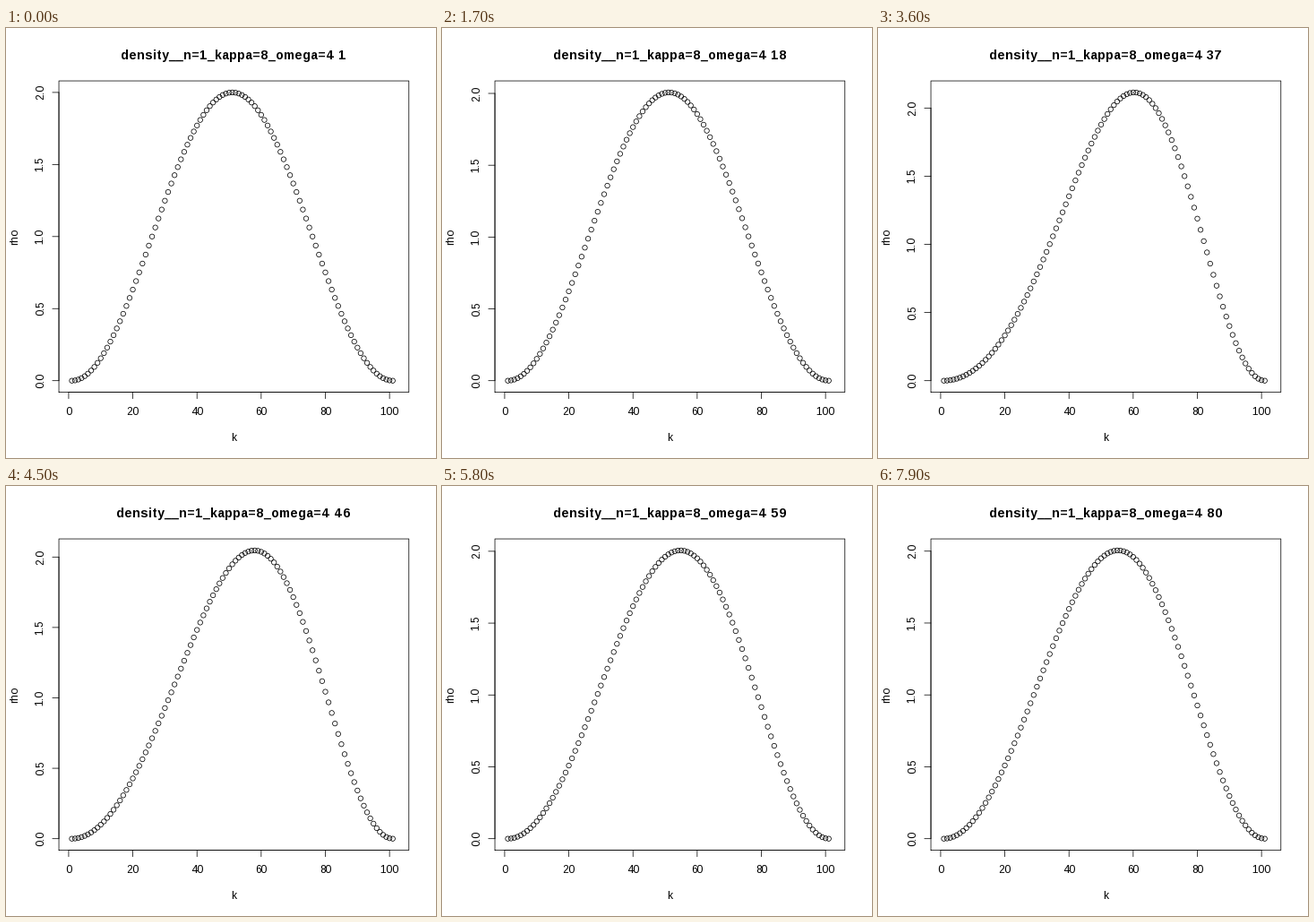
A matplotlib script for the animation above (8 s loop, 480 by 480 pixels).

```python
import numpy as np
import matplotlib.pyplot as plt
from matplotlib.animation import FuncAnimation
from matplotlib.collections import EllipseCollection

plt.rcParams.update({
    "font.family": "Liberation Sans",
    "font.size": 12,
    "text.hinting": "force_autohint",
    "text.hinting_factor": 1,
    "path.snap": False,
})

SIZE, DPI = 480, 72
FRAMES, INTERVAL = 80, 100
LEFT, RIGHT, TOP, BOTTOM = 59.04, 449.76, 59.04, 406.56
LINE = 14.4          # height of one margin line
TICK = 7.2
STROKE = 0.75

# Particle in a unit box, pushed by a constant field from t = 0
CELLS, FIELD, DT = 100, 7.07, 0.1
x = np.linspace(0, 1, CELLS + 1)
inner = x[1:-1]
hop = -0.5 * CELLS**2 * np.ones(CELLS - 2)
H = np.diag(CELLS**2 - FIELD * (inner - 0.5)) + np.diag(hop, 1) + np.diag(hop, -1)
energy, modes = np.linalg.eigh(H)
start = modes.T @ (np.sqrt(2) * np.sin(np.pi * inner))


def density(t):
    psi = modes @ (np.exp(-1j * energy * t) * start)
    return np.pad(np.abs(psi) ** 2, 1)


def scale(v, low, high):
    """Place v on an axis that reaches 4 % past both limits."""
    return ((v - low) / (high - low) + 0.04) / 1.08


def to_x(k):
    return LEFT + (RIGHT - LEFT) * scale(k, 1, CELLS + 2)


def to_y(rho, peak):
    return BOTTOM - (BOTTOM - TOP) * scale(rho, 0, peak)


fig = plt.figure(figsize=(SIZE / DPI, SIZE / DPI), dpi=DPI, facecolor="white")
ax = fig.add_axes([0, 0, 1, 1])
ax.set_xlim(0, SIZE)
ax.set_ylim(SIZE, 0)
ax.axis("off")


def line(xs=(), ys=()):
    return ax.plot(xs, ys, color="black", lw=STROKE, solid_capstyle="round",
                   solid_joinstyle="round")[0]


def label(px, py, text, **style):
    return ax.text(px, py, text, ha="center", va="baseline",
                   rotation_mode="anchor", **style)


mid_x, mid_y = (LEFT + RIGHT) / 2, (TOP + BOTTOM) / 2
line([LEFT, RIGHT, RIGHT, LEFT, LEFT], [BOTTOM, BOTTOM, TOP, TOP, BOTTOM])
title = label(mid_x, 34.8, "", size=14.4, weight="bold")
label(mid_x, BOTTOM + 3.8 * LINE, "k")
label(LEFT - 3.2 * LINE, mid_y, "rho", rotation=90)

line([to_x(0), to_x(100)], [BOTTOM, BOTTOM])
for k in range(0, 101, 20):
    line([to_x(k)] * 2, [BOTTOM, BOTTOM + TICK])
    label(to_x(k), BOTTOM + 1.8 * LINE, str(k))

levels = np.arange(5) * 0.5
y_axis = line()
y_ticks = [line() for _ in levels]
y_labels = [label(LEFT - 1.2 * LINE, 0, f"{v:.1f}", rotation=90) for v in levels]

ks = np.arange(1, CELLS + 2)
diam = np.full(ks.size, 5.4)
dots = EllipseCollection(diam, diam, np.zeros(ks.size), units="xy",
                         offsets=np.zeros((ks.size, 2)),
                         offset_transform=ax.transData,
                         facecolors="none", edgecolors="black",
                         linewidths=STROKE)
ax.add_collection(dots, autolim=False)


def draw(i):
    rho = density(i * DT)
    peak = rho.max()
    title.set_text(f"density__n=1_kappa=8_omega=4 {i + 1}")
    dots.set_offsets(np.column_stack([to_x(ks), to_y(rho, peak)]))
    ys = to_y(levels, peak)
    y_axis.set_data([LEFT, LEFT], [ys[0], ys[-1]])
    for y, tick, text in zip(ys, y_ticks, y_labels):
        tick.set_data([LEFT - TICK, LEFT], [y, y])
        text.set_y(y)
    return [title, dots, y_axis, *y_ticks, *y_labels]


anim = FuncAnimation(fig, draw, frames=FRAMES, interval=INTERVAL,
                     repeat=True, repeat_delay=0, blit=False)
plt.show()
```
